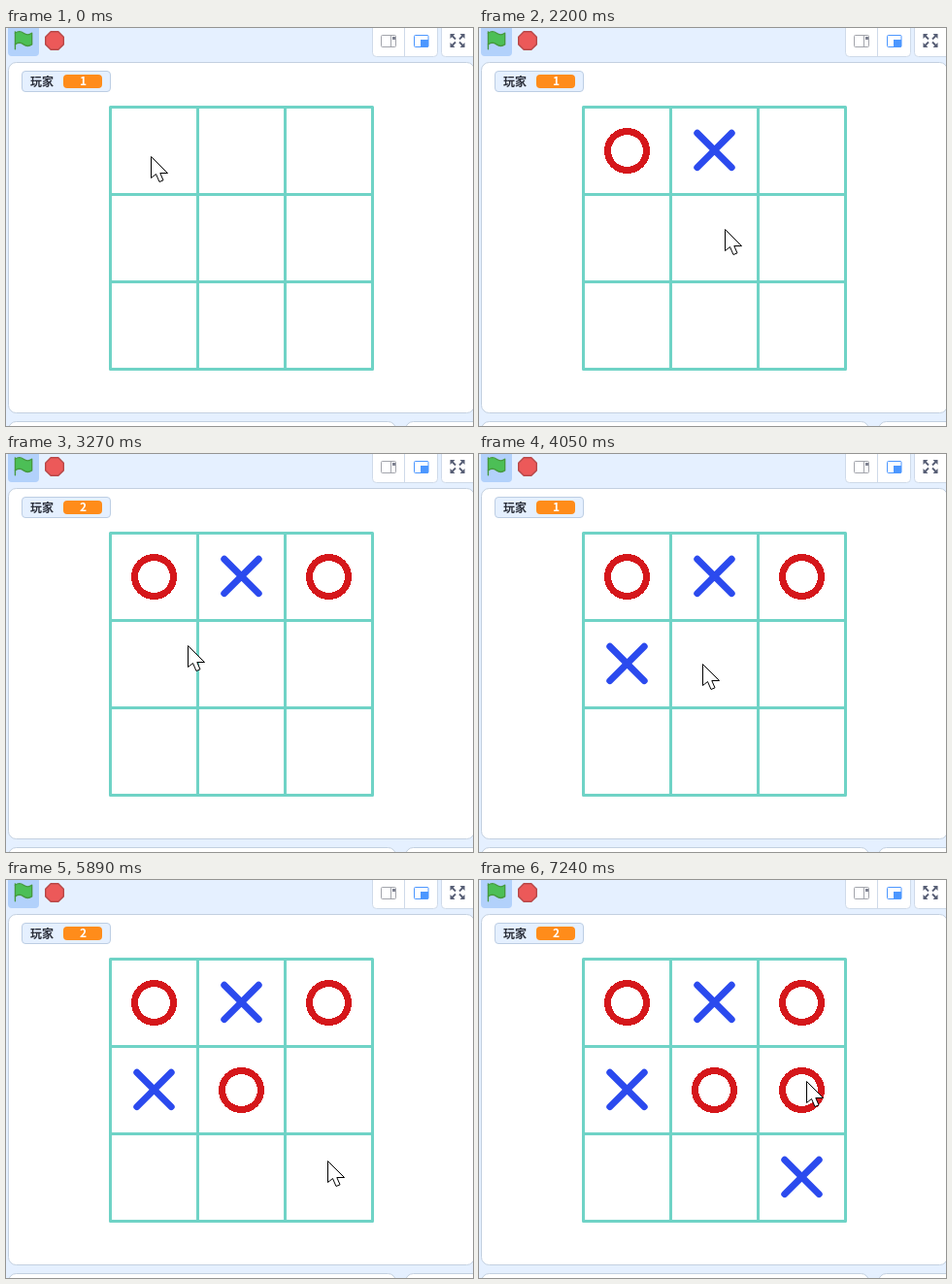
An HTML page that plays this animation: 481x410 px, repeating every 8000 ms.

```html
<!DOCTYPE html>
<html lang="zh">
<head>
<meta charset="utf-8">
<style>
  html, body { margin: 0; width: 100%; height: 100%; overflow: hidden; background: #e5f0ff; }
  svg { display: block; }
  text { font: bold 12px "Noto Sans CJK SC", "Noto Sans CJK", "Noto Sans CJK JP", sans-serif; }
</style>
</head>
<body>
<svg width="481" height="410" viewBox="0 0 481 410">
  <defs>
    <circle id="O" r="20" fill="none" stroke="#d5171b" stroke-width="7" shape-rendering="crispEdges"/>
    <path id="X" d="M-17.7-18.3 17.7 17.1M17.7-18.3-17.7 17.1" fill="none" stroke="#2b4aee" stroke-width="7" stroke-linecap="round"/>
  </defs>

  <!-- toolbar -->
  <rect x="2" y="-8" width="32" height="37" rx="4" fill="#b2d1fb"/>
  <g transform="translate(8.6 3) scale(1.12)" fill="#4cbf56" stroke="#45993d" stroke-width="1.2" stroke-linecap="round" stroke-linejoin="round">
    <path d="M.75 2A6.44 6.44 0 0 1 8.44 2a6.44 6.44 0 0 0 7.69 0V12.4a6.44 6.44 0 0 1-7.69 0a6.44 6.44 0 0 0-7.69 0"/>
    <path d="M.75 16.75V.75"/>
  </g>
  <path transform="translate(40 3) scale(1.43)" d="M4.3.5H9.7L13.5 4.3V9.7L9.7 13.5H4.3L.5 9.7V4.3Z" fill="#ec5959" stroke="#b84848" stroke-linejoin="round"/>
  <g fill="#fff" stroke="#cfdae9">
    <rect x="377.5" y="-8" width="67" height="37.5" rx="4"/>
    <path d="M410.5 0V29"/>
    <rect x="448.5" y="-8" width="44" height="37.5" rx="4"/>
  </g>
  <g fill="none" stroke="#a3a5ac">
    <rect x="386.5" y="7.5" width="15" height="12" rx="1"/>
    <path d="M396.5 7.5V19.5"/>
    <path d="M398 9H401V12H398Z" fill="#7d8190" stroke="none"/>
  </g>
  <rect x="420.5" y="7.5" width="14.5" height="12" rx="1" fill="none" stroke="#4c97ff"/>
  <path d="M427 12H435V19.5H427Z" fill="#4c97ff"/>
  <g transform="translate(-.5)" fill="#575e75" stroke="#575e75" stroke-width="1.8">
    <path d="M459 7 463.5 11.5M472 7 467.5 11.5M459 19 463.5 14.5M472 19 467.5 14.5"/>
    <path stroke="none" d="M458 6h5l-5 5zM473 6v5l-5-5zM458 20v-5l5 5zM473 20h-5l5-5z"/>
  </g>

  <!-- stage and panels -->
  <g fill="#fff" stroke="#c3d0e0">
    <rect x="2.5" y="35.5" width="480" height="361" rx="8"/>
    <rect x="2.5" y="405.5" width="399" height="30" rx="8"/>
    <rect x="411.5" y="405.5" width="90" height="30" rx="8"/>
  </g>

  <!-- turn monitor -->
  <rect x="16.5" y="44.5" width="91" height="21" rx="3.5" fill="#e5f0ff" stroke="#bccde3"/>
  <text x="25" y="59.5" fill="#2b2f3a">玩家</text>
  <rect x="59" y="48" width="40" height="14" rx="4" fill="#ff8c1a"/>
  <text id="player" x="79.5" y="59.4" text-anchor="middle" fill="#fff">1</text>

  <path d="M107.5 81.5h270v270h-270zm90 0v270m90-270v270M107.5 171.5h270m-270 90h270" fill="none" stroke="#6fd3c6" stroke-width="3" stroke-linejoin="round"/>
  <g id="marks"></g>
  <path id="cursor" d="M.5.5V22.5L5.5 18.5 9 26.5 13 24.8 9.8 17.5H17.5Z" fill="#fff" stroke="#000"/>
</svg>
<script>
const LOOP = 8000;
const SAMPLE = 120; // the pointer is seen only this often while it moves

// players alternate, O first
const turns = [
  { time: 840, cell: 0 }, { time: 1530, cell: 1 }, { time: 2880, cell: 2 }, { time: 3780, cell: 3 },
  { time: 4790, cell: 4 }, { time: 6450, cell: 8 }, { time: 7000, cell: 5 }
];

// each move eases out to (x, y) in a number of visible steps
const moves = [
  { time: 560, steps: 1, x: 158, y: 132 },
  { time: 1150, steps: 1, x: 233, y: 131 },
  { time: 1290, steps: 2, x: 236, y: 130 },
  { time: 1800, steps: 1, x: 250, y: 133 },
  { time: 1950, steps: 3, x: 253, y: 207 },
  { time: 2340, steps: 4, x: 317, y: 136 },
  { time: 3030, steps: 5, x: 162, y: 209 },
  { time: 3930, steps: 3, x: 239, y: 217 },
  { time: 5070, steps: 2, x: 328, y: 213 },
  { time: 5620, steps: 5, x: 331, y: 304 },
  { time: 6610, steps: 2, x: 347, y: 194 },
  { time: 7120, steps: 2, x: 337, y: 207 }
];

const $ = id => document.getElementById(id);
const easeOut = p => 1 - (1 - p) ** 2;

const marks = turns.map(({ cell }, i) => {
  const mark = document.createElementNS("http://www.w3.org/2000/svg", "use");
  mark.setAttribute("href", i % 2 ? "#X" : "#O");
  mark.setAttribute("x", 152.5 + cell % 3 * 90);
  mark.setAttribute("y", 126.5 + Math.floor(cell / 3) * 90);
  $("marks").append(mark);
  return mark;
});

function pointerAt(t) {
  let x = 149, y = 132;
  for (const move of moves) {
    if (t < move.time) break;
    const step = Math.floor((t - move.time) / SAMPLE) + 1;
    const progress = easeOut(Math.min(step / move.steps, 1));
    x += (move.x - x) * progress;
    y += (move.y - y) * progress;
  }
  return [Math.round(x), Math.round(y)];
}

function draw(t) {
  const played = turns.filter(({ time }) => time <= t).length;
  marks.forEach((mark, i) => mark.setAttribute("visibility", i < played ? "visible" : "hidden"));
  $("player").textContent = 1 + played % 2;
  $("cursor").setAttribute("transform", `translate(${pointerAt(t)})`);
}

const start = performance.now();
function tick() {
  draw((performance.now() - start) % LOOP);
  requestAnimationFrame(tick);
}
tick();
</script>
</body>
</html>
```
